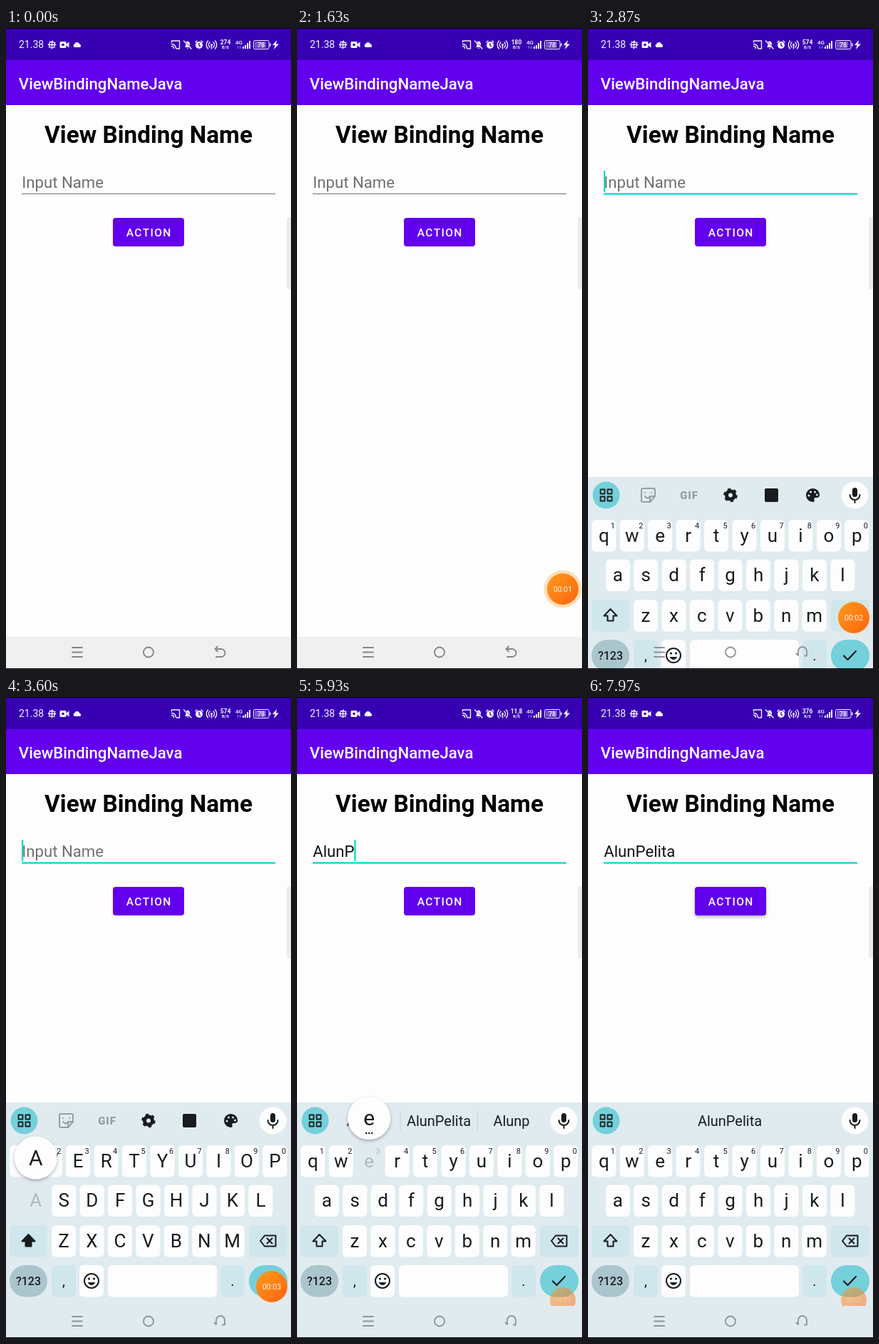
An HTML page for the animation above (8000 ms loop, 400 by 898 pixels).

```html
<!DOCTYPE html>
<html lang="en">
<head>
<meta charset="utf-8">
<title>View binding form</title>
<style>
html, body { margin: 0; width: 100%; height: 100%; overflow: hidden; background: #fdfdfd; }
svg { display: block; width: 100%; height: 100%; }
text { font-family: Roboto, sans-serif; }
.mid { text-anchor: middle; }
.line { fill: none; stroke: currentColor; stroke-linecap: round; stroke-linejoin: round; }
#status { color: #f6f4ff; fill: #f6f4ff; }
#kb { color: #191c1e; fill: #191c1e; }
#kb .key { fill: #fdfdfd; }
#kb .side { fill: #cfe6ec; }
</style>
</head>
<body>
<svg viewBox="0 0 400 898">
  <defs>
    <linearGradient id="orange" x1="0" y1="0" x2="1" y2="1">
      <stop stop-color="#ff9a1c"/><stop offset="1" stop-color="#ff6410"/>
    </linearGradient>
    <clipPath id="aboveNav"><rect width="400" height="853"/></clipPath>
    <filter id="soft" x="-30%" y="-30%" width="160%" height="170%">
      <feDropShadow dx="0" dy="2" stdDeviation="2" flood-color="#30383c" flood-opacity=".4"/>
    </filter>
  </defs>

  <rect width="400" height="898" fill="#fdfdfd"/>
  <rect width="400" height="45" fill="#3700b3"/>
  <rect y="45" width="400" height="63" fill="#6200ee"/>
  <rect width="400" height="1"/>

  <g id="status">
    <text x="18" y="28" font-size="14">21.38</text>
    <g class="line" stroke-width="1.3">
      <circle cx="64.500" cy="23.500" r="4"/><path d="M60 23.500h9M64.500 19v9"/>
      <circle cx="64.500" cy="23.500" r="5.200" stroke-width="1.600" stroke-dasharray=".1 4"/>
    </g>
    <path d="M77 19h6q1.500 0 1.500 1.500v2l4-3v8l-4-3v2q0 1.500-1.500 1.500h-6q-1.500 0-1.500-1.500v-6q0-1.500 1.500-1.500z"/>
    <circle cx="80" cy="23.500" r="1.800" fill="#3700b3"/>
    <path d="M96 27a2.600 2.600 0 0 1 0-4.600 4 4 0 0 1 7.300 0 2.600 2.600 0 0 1 .7 4.600z"/>
    <g class="line" stroke-width="1.400">
      <path d="M232.500 20v-2h11v11h-4M232.500 22.500a6 6 0 0 1 6 6M232.500 25.500a3 3 0 0 1 3 3"/>
      <path d="M249.500 18l10.500 11"/>
      <path d="M266 20l2-2M276 20l-2-2"/>
      <path d="M286 20a5 5 0 0 0 0 7M291 20a5 5 0 0 1 0 7M283.500 18a8 8 0 0 0 0 11M293.500 18a8 8 0 0 1 0 11M288.500 24v5"/>
    </g>
    <path d="M251 27l1.200-2v-3l6 5zM252.500 19.500q4-3 5.500 2v3.500zM253.500 28h3q-1.500 2-3 0z"/>
    <circle cx="271" cy="24" r="5"/><path d="M271 21v3.500l2 1.500" fill="none" stroke="#3700b3" stroke-width="1.300"/>
    <circle cx="288.500" cy="23.500" r="1.500"/>
    <text id="rate" class="mid" x="308" y="22.500" font-size="8.500" font-weight="700">274</text>
    <text id="unit" class="mid" x="308" y="29" font-size="6" font-weight="700">B/S</text>
    <text class="mid" x="327" y="23" font-size="8" font-weight="500">4G</text>
    <path class="line" d="M325.500 25.500v3M328.500 25.500v3" stroke-width=".8" opacity=".7"/>
    <path d="M332 26h2v3h-2zM335 24h2v5h-2zM338 21h2v8h-2zM341 18h2v11h-2z"/>
    <rect class="line" x="347.500" y="17.500" width="21.500" height="12" rx="2"/>
    <rect x="349" y="19" width="16" height="9" rx="1" opacity=".35"/>
    <path d="M370 21.500h1.500v4h-1.500zM380 17l-6 7h3.500l-1.500 6 7-7.500h-4z"/>
    <text class="mid" x="358" y="27" font-size="9" font-weight="500">78</text>
  </g>

  <text x="17.800" y="86" font-size="22.200" font-weight="500" fill="#fff">ViewBindingNameJava</text>
  <text class="mid" x="200" y="161" font-size="33.300" font-weight="700">View Binding Name</text>
  <text id="entry" x="22.200" y="223.500" font-size="22.200"></text>
  <rect id="underline" x="22" width="356"/>
  <rect id="caret" y="200" width="2.200" height="30" fill="#03dac5"/>
  <rect id="button" x="150" y="266" width="100" height="40" rx="4" fill="#6200ee"/>
  <text x="168.800" y="292" font-size="15.500" font-weight="500" letter-spacing="1.390" fill="#fff">ACTION</text>
  <path d="M400 265h-3q-3 0-3 4v93q0 4 3 4h3z" fill="#ececec"/>
  <rect y="853" width="400" height="44" fill="#f0f0f0"/>

  <g id="kb">
    <rect y="568" width="400" height="330" fill="#e0ebf0"/>
    <circle cx="25.500" cy="593.500" r="19" fill="#74d0da"/>
    <path class="line" stroke-width="1.800" d="M17.500 585.500h6v6h-6zM27.500 585.500h6v6h-6zM17.500 595.500h6v6h-6zM27.500 595.500h6v6h-6z"/>
    <g id="tools">
      <path class="line" stroke-width="2" style="color:#969ea2" d="M77 584h15q2 0 2 2v9l-7 8h-10q-2 0-2-2v-15q0-2 2-2zM94 595h-5q-2 0-2 2v6M80 595q4 5 7 0M80 590h.1M89 590h.1"/>
      <text class="mid" x="142" y="599" font-size="15" font-weight="900" letter-spacing=".8" fill="#969ea2">GIF</text>
      <circle cx="200" cy="593.500" r="5.500" fill="none" stroke="currentColor" stroke-width="5"/>
      <circle cx="200" cy="593.500" r="8.300" fill="none" stroke="currentColor" stroke-width="3" stroke-dasharray="4.300 4.390"/>
      <rect x="248" y="584" width="19" height="19" rx="2"/>
      <path d="M315.500 584a9.500 9.500 0 1 0 0 19q3 0 2-3-1-3 2-3h2.500q3.500-1 3-4.500-1-8-9.500-8.500z"/>
      <g fill="#e0ebf0"><circle cx="310" cy="594" r="1.500"/><circle cx="312.500" cy="589" r="1.500"/><circle cx="318.500" cy="589" r="1.500"/><circle cx="321.500" cy="593" r="1.500"/></g>
    </g>
    <g id="words" class="mid" font-size="20">
      <path id="bars" d="M145 579v29M253.500 579v29" stroke="#c6d2d8"/>
      <text x="96" y="601"></text><text x="199" y="601"></text><text x="301" y="601"></text>
    </g>
    <circle cx="374.500" cy="593.500" r="19" fill="#fdfdfd"/>
    <rect x="371" y="583" width="7" height="13" rx="3.500"/>
    <path class="line" stroke-width="2" d="M367.500 593a7 7 0 0 0 14 0M374.500 600v4"/>
    <g id="keys"></g>
    <path id="shift" class="line" stroke-width="2" d="M31.500 753l-9 9.500h5v7h8v-7h5z"/>
    <path class="line" stroke-width="2" d="M363 754.500h15.500v15h-15.500l-6-7.500zM366.500 758.500l7 7M373.500 758.500l-7 7"/>
    <text class="mid" x="31.500" y="823.500" font-size="16" font-weight="500">?123</text>
    <text class="mid" x="81" y="825" font-size="20">,</text>
    <text class="mid" x="318" y="825" font-size="20">.</text>
    <circle class="line" cx="120" cy="818" r="10" stroke-width="2"/>
    <circle cx="116.500" cy="815" r="1.600"/><circle cx="123.500" cy="815" r="1.600"/>
    <path d="M114.500 820h11q-5.500 8-11 0z"/>
    <path class="line" stroke-width="2.200" d="M359 818.500l5.500 5.500 11.500-12"/>
    <g id="popup">
      <circle r="30" fill="#fdfdfd" filter="url(#soft)"/>
      <text class="mid" y="10" font-size="30"></text>
      <path class="line" stroke-width="2.400" d="M-4 21h.1M0 21h.1M4 21h.1"/>
    </g>
  </g>

  <g class="line" id="nav" stroke-width="1.800">
    <path d="M93 868h14M93 874.500h14M93 881h14"/>
    <circle cx="200" cy="874.500" r="7"/>
    <path id="back"/>
  </g>

  <g clip-path="url(#aboveNav)">
    <g id="bubble">
      <circle id="halo" r="26.500" fill="#ffe0b8"/>
      <circle r="22" fill="url(#orange)"/>
      <text id="timer" class="mid" y="3.700" font-size="10.500" fill="#fff4e4"></text>
    </g>
  </g>
  <rect y="897" width="400" height="1"/>
</svg>
<script>
const LOOP = 8000, WORD = "AlunPelita";
const $ = id => document.getElementById(id);
const set = (el, attrs) => { for (const k in attrs) el.setAttribute(k, attrs[k]); };
const show = (el, on) => { el.style.display = on ? "" : "none"; };
// decelerating progress from 0 to 1
const ramp = (t, a, b) => {
  const p = Math.min(1, Math.max(0, (t - a) / (b - a)));
  return 1 - (1 - p) ** 2;
};
const latest = (steps, t) => steps.filter(s => t >= s[0]).pop();

const rates = [[0, "274", "B/S"], [300, "180", "B/S"], [1970, "574", "B/S"],
  [4000, "11,8", "K/S"], [6130, "376", "K/S"]];
// key down and key up for each letter of WORD
const presses = [[3570, 3700], [3870, 3970], [4070, 4170], [4300, 4400], [5600, 5700],
  [5930, 6030], [6100, 6200], [6470, 6570], [6630, 6730], [6900, 7000]];
const capsSpans = [[3330, 3700], [5130, 5700]];
const early = [[], ["Aku", "Ada"], ["Alun", "Alam"], ["Alun", "Alur"], [WORD, "Alun-alun"], [WORD, "Alunp"]];

const PITCH = 39.45, keys = {};
const rect = (x, y, w, cls, rx = 6, fill = "") =>
  `<rect class="${cls}" x="${x}" y="${y}" width="${w}" height="44.500" rx="${rx}" ${fill && `style="fill:${fill}"`}/>`;
let markup = rect(5, 740, 53, "side") + rect(341, 740, 54, "side") +
  rect(5, 796, 53, "", 22, "#abc5cd") + rect(64, 796, 34, "side") + rect(103, 796, 34, "key") +
  rect(143, 796, 153, "key") + rect(301, 796, 34, "side") + rect(341, 796, 54, "", 22, "#74d0da");
[["qwertyuiop", 22.3, 628], ["asdfghjkl", 41.8, 683.5], ["zxcvbnm", 81, 740]].forEach(([row, x0, y], r) => {
  [...row].forEach((c, i) => {
    const x = x0 + i * PITCH;
    keys[c] = { x, y: y + 22 };
    markup += `<g id="key-${c}">${rect(x - 17, y, 34, "key")}` +
      `<text class="mid" x="${x}" y="${y + 30.5}" font-size="26">${c}</text>` +
      (r ? "" : `<text class="mid" x="${x + 12.5}" y="${y + 12}" font-size="11">${(i + 1) % 10}</text>`) + "</g>";
  });
});
$("keys").innerHTML = markup;
for (const c in keys) {
  const [box, label] = $("key-" + c).children;
  Object.assign(keys[c], { box, label, group: $("key-" + c) });
}
const [leftWord, midWord, rightWord] = $("words").querySelectorAll("text");
const [, popLabel, popDots] = $("popup").children;

function drawField(t, typed) {
  const focused = t >= 2370, entry = $("entry");
  entry.textContent = typed || "Input Name";
  set(entry, { fill: typed ? "#111" : "#707070" });
  set($("underline"), focused ? { y: 231.3, height: 2.3, fill: "#03dac5" } : { y: 231.7, height: 1.1, fill: "#707070" });
  show($("caret"), focused && t < 7500);
  set($("caret"), { x: 22 + (typed ? entry.getComputedTextLength() : 0) });
  const lift = ramp(t, 7770, 7970);
  $("button").style.filter = lift ? `drop-shadow(0 2px 2px rgba(60, 60, 60, ${0.4 * lift}))` : "";
}

function drawWords(typed) {
  const n = typed.length, done = n === WORD.length;
  show($("tools"), !n);
  show($("words"), n);
  show($("bars"), !done);
  leftWord.textContent = done ? "" : typed;
  midWord.textContent = n > 5 ? WORD : early[n][0] || "";
  rightWord.textContent = n > 5 ? "" : early[n][1] || "";
  set(midWord, { "font-weight": n < 5 ? 500 : 400 });
}

function drawKeyboard(t, typed) {
  const open = t >= 2730;
  show($("kb"), open);
  set($("kb"), { transform: `translate(0 ${330 * (1 - ramp(t, 2700, 3000))})` });
  $("nav").style.color = open ? "#8d9498" : "#858585";
  set($("back"), { d: open ? "M295 879v-6a6 6 0 0 1 12 0v6.500h-3M295 879l-2.500-2.500"
    : "M294 870h8a5.500 5.500 0 0 1 0 11h-7M297 866.500l-3.500 3.500 3.500 3.500" });

  const caps = capsSpans.some(([on, off]) => t >= on && t < off);
  const held = presses.findIndex(([down, up]) => t >= down && t < up);
  const letter = WORD[held] || "", heldKey = letter.toLowerCase();
  for (const c in keys) {
    const { box, label, group } = keys[c], down = c === heldKey;
    label.textContent = caps ? c.toUpperCase() : c;
    set(box, { opacity: down ? 0 : 1 });
    set(group, { fill: down ? "#b0b8bc" : "#191c1e" });
  }
  $("shift").style.fill = caps ? "currentColor" : "none";
  show($("popup"), letter);
  if (letter) {
    const { x, y } = keys[heldKey];
    set($("popup"), { transform: `translate(${Math.min(368, x)} ${y - 60})` });
    popLabel.textContent = letter;
    show(popDots, "eui".includes(letter));
  }
  drawWords(typed);
}

function drawBubble(t) {
  const dock = ramp(t, 3970, 4270), fade = ramp(t, 4270, 4830);
  const x = 373 + 55 * (1 - ramp(t, 970, 1370));
  const y = 786 + 40 * ramp(t, 1670, 2070) + 19 * dock;
  show($("bubble"), t >= 970);
  set($("bubble"), { transform: `translate(${x} ${y}) scale(${1 - 0.18 * dock})`, opacity: 1 - 0.5 * fade });
  set($("halo"), { opacity: 1 - ramp(t, 2700, 3000) });
  set($("timer"), { opacity: 1 - 0.6 * dock });
  $("timer").textContent = "00:0" + Math.max(0, Math.floor((t - 400) / 1000));
}

function frame() {
  const t = performance.now() % LOOP;
  const typed = WORD.slice(0, presses.filter(p => t >= p[1]).length);
  const [, rate, unit] = latest(rates, t);
  $("rate").textContent = rate;
  $("unit").textContent = unit;
  drawField(t, typed);
  drawKeyboard(t, typed);
  drawBubble(t);
  requestAnimationFrame(frame);
}
frame();
</script>
</body>
</html>
```
